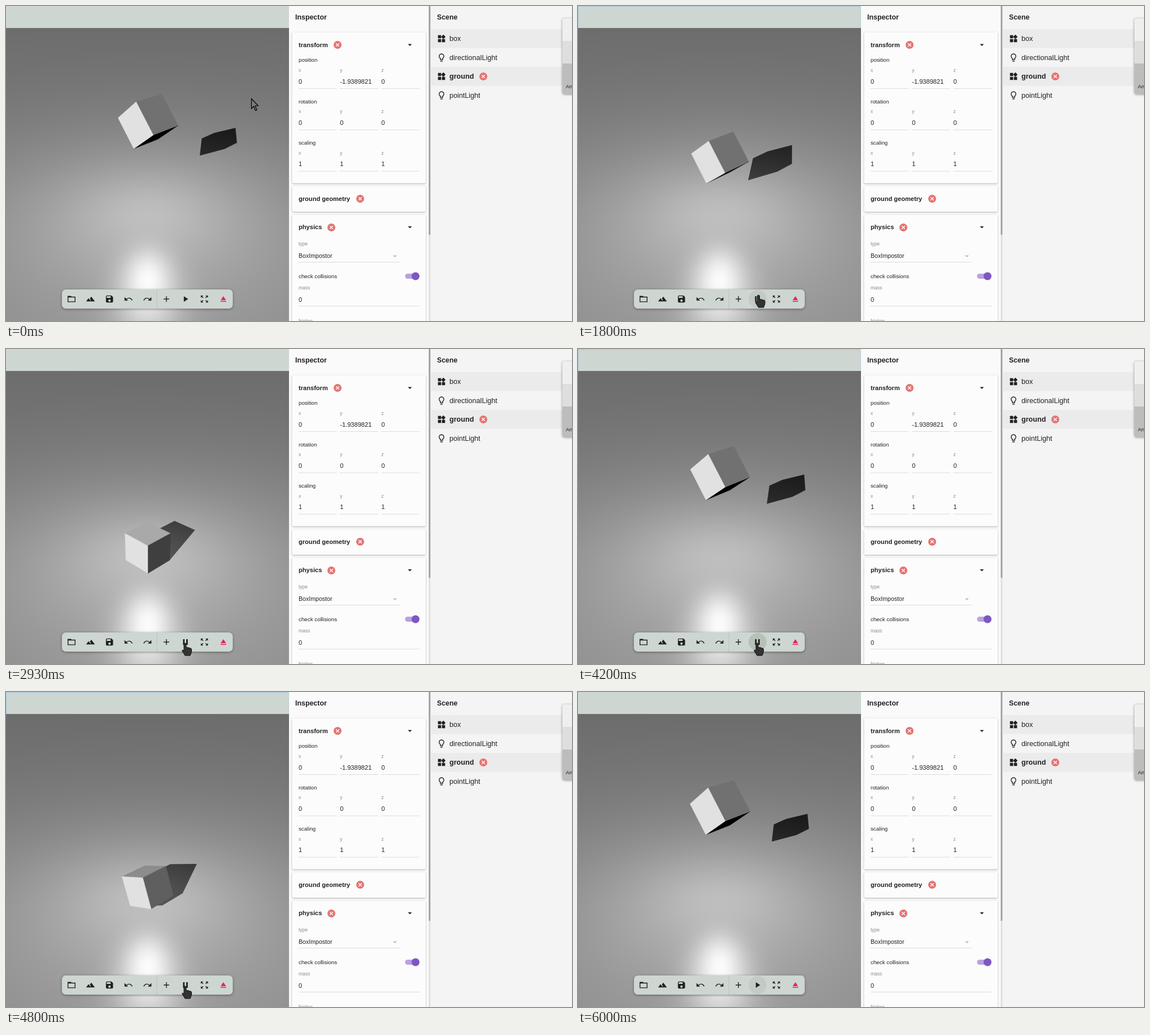
Recreate the animation shown at these times as an HTML page with a canvas. Size 1002 by 559 pixels, loop 6.54 s.

```html
<!DOCTYPE html>
<html lang="en">
<head>
<meta charset="utf-8">
<title>Scene editor</title>
<style>
  html, body { margin: 0; width: 100%; height: 100%; overflow: hidden; background: #f4f4f4; }
  canvas, svg { position: absolute; left: 0; top: 0; }
  text { font-family: "Liberation Sans", Arial, sans-serif; fill: #212121; }
  .bold { font-weight: bold; }
  .dim { fill: #8a8a8a; }
  .card { fill: #fcfcfc; filter: drop-shadow(0 1px 1.5px rgba(0, 0, 0, .3)); }
</style>
</head>
<body>
<canvas id="view" width="501" height="559"></canvas>
<svg id="ui" width="1002" height="559"></svg>
<script>
const LOOP = 6540, W = 501, H = 559;

// ---------- interface ----------
const text = (x, y, size, label, cls = '') =>
  `<text x="${x}" y="${y + size * .35}" font-size="${size}" class="${cls}">${label}</text>`;
const rect = (x, y, w, h, fill, more = '') =>
  `<rect x="${x}" y="${y}" width="${w}" height="${h}" fill="${fill}" ${more}/>`;
const icon = (x, y, shape, more = 'fill="#212121"') =>
  `<g transform="translate(${x - 8.4} ${y - 8.4}) scale(.7)" ${more}>${shape}</g>`;
const path = (d, more = '') => `<path d="${d}" ${more}/>`;
const line = 'fill="none" stroke="#212121" stroke-width="2"';
const remove = (x, y) => `<circle cx="${x}" cy="${y}" r="7" fill="#e57373"/>` +
  path(`M${x - 2.8} ${y - 2.8}l5.6 5.6m0-5.6l-5.6 5.6`, 'stroke="#fff" stroke-width="1.4"');
const caret = (x, y, fill = '#212121') => path(`M${x - 3.5} ${y - 1.5}h7l-3.5 3.5z`, `fill="${fill}"`);
const card = (y, h) => rect(506.5, y, 236.5, h, '#fcfcfc', 'rx="2" class="card"');

const widgets = path('M13 13h8v8h-8zM3 13h8v8H3zM3 3h8v8H3zM16.7 1.7l5.6 5.6-5.6 5.7L11 7.3z');
const bulb = path('M9 17v-3A6 6 0 1 1 15 14v3zM9 21h6', line);
const undo = path('M2 7v9h9z') + path('M6 13C11 7.500 19 9 21.300 15.600', line);
const arrowOut = 'M15 3h6v6l-2.300-2.300-2.900 2.900-1.400-1.400 2.900-2.900z';
const tools = [
  path('M3 7V19H21V7H12L10 5H3V7H21', line),
  path('M14 6l-3.750 5 2.850 3.800-1.600 1.200L7 10l-6 8h22z'),
  path('M3 5l2-2h12l4 4v12l-2 2H5l-2-2zM5 5v4h10V5zM12 13a3 3 0 1 0 .1 0z', 'fill-rule="evenodd"'),
  undo,
  `<g transform="translate(24) scale(-1 1)">${undo}</g>`,
  path('M11 5h2v6h6v2h-6v6h-2v-6H5v-2h6z'),
  path('M8 5v14l11-7z', 'id="play"') + path('M6 5h4v14H6zM14 5h4v14h-4z', 'id="pause"'),
  [0, 90, 180, 270].map(a => path(arrowOut, `transform="rotate(${a} 12 12)"`)).join(''),
  path('M5 17h14v2H5zM12 5L5.300 15h13.400z', 'fill="#e91e63"')
];

const vector = (name, y, values) => text(518, y, 9.7, name) + values.map((value, i) => {
  const x = 518 + 73.2 * i;
  return text(x, y + 18, 8.5, 'xyz'[i], 'dim') + text(x, y + 38, 11.1, value) +
    rect(x, y + 50, 67.5, 1, '#dcdcdc');
}).join('');

const row = (y, name, shape, cls) => icon(771, y, shape) + text(785, y, 12.6, name, cls);

document.getElementById('ui').innerHTML = [
  path('M.5 39V.5H501V39', 'id="focus" fill="none" stroke="#a9c6e0"'),

  rect(501, 0, 248, H, '#fafafa'),
  text(512, 20, 12.4, 'Inspector', 'bold'),
  card(46.5, 268), card(320, 45), card(370.5, 250),
  text(518, 69, 11.1, 'transform', 'bold'), remove(587, 69), caret(715, 69),
  vector('position', 96, ['0', '-1.9389821', '0']),
  vector('rotation', 169.300, ['0', '0', '0']),
  vector('scaling', 242.600, ['1', '1', '1']),
  text(518, 342, 11.1, 'ground geometry', 'bold'), remove(627, 342),
  text(518, 392.500, 11.1, 'physics', 'bold'), remove(576, 393), caret(715, 392.500),
  text(518, 422.500, 8.5, 'type', 'dim'),
  text(518, 443, 10.6, 'BoxImpostor'), caret(688.500, 444, '#bdbdbd'),
  rect(518, 454, 179, 1, '#dcdcdc'),
  text(518, 479.500, 9.8, 'check collisions'),
  rect(706.500, 475, 22, 9, '#b7a3dd', 'rx="4.5"'),
  '<circle cx="725" cy="479.500" r="7" fill="#7e57c2"/>',
  text(518, 500.500, 8.5, 'mass', 'dim'), text(518, 521, 11.1, '0'),
  rect(518, 532, 214, 1, '#dcdcdc'),
  text(518, 559, 8.5, 'friction', 'dim'),

  rect(748.500, 0, 3, H, '#dedede'), rect(748.500, 0, 3, 406, '#9e9e9e'),
  rect(751.500, 0, 251, H, '#f4f4f4'),
  text(763, 20, 12.3, 'Scene', 'bold'),
  rect(751.500, 41, 251, 33.500, '#ebebeb'), rect(751.500, 108, 251, 33.500, '#ebebeb'),
  row(58, 'box', widgets), row(91.500, 'directionalLight', bulb),
  row(125, 'ground', widgets, 'bold'), remove(845, 125), row(158.500, 'pointLight', bulb),
  '<g style="filter:drop-shadow(0 1px 2px rgba(0,0,0,.4))">',
  rect(985, 22, 30, 134, '#bdbdbd', 'rx="4"'),
  path('M985 102V26q0-4 4-4h13v80z', 'fill="#dedede"'),
  path('M985 62V26q0-4 4-4h13v40z', 'fill="#efefef"'), '</g>',
  text(991, 143, 9.7, 'An'),

  rect(99, 503, 302.500, 34, '#cdd6d0', 'rx="7" style="filter:drop-shadow(0 1px 2px rgba(0,0,0,.4))"'),
  rect(266.500, 503, 1, 34, '#b9c2bc'),
  '<circle id="ripple" cx="318" cy="520"/>',
  ...tools.map((shape, i) => icon(116 + 33.600 * i, 520, shape)),

  '<g id="cursor">',
  path('M.5.5V18l4-4 3 7.500 2.600-1-3-7.500h5.400z', 'id="arrow" fill="none" stroke="#000" stroke-width="1.2"'),
  path('M-2 2Q-2 0 0 0T2 2V8Q3 6.500 5 8Q7 7 8 9Q11 8 11.500 11V15Q11 18 9 22H0Q-3 17-5 14Q-6 11-2 13Z',
    'id="hand" fill="#333" stroke="#111"'),
  '</g>'
].join('');

// ---------- 3D scene ----------
const FOCAL = H / 2 / Math.tan(.4), COS = 2 / Math.sqrt(5), SIN = 1 / Math.sqrt(5);
const EYE = [0, 5, -10], FLOOR = -1.939, LAMP = 2.94;
const SLOPE = [1.034, 1.93];               // shadow shift per unit of height
const SUN = [-.431, .417, -.805];
const dot = (a, b) => a[0] * b[0] + a[1] * b[1] + a[2] * b[2];

function project([x, y, z]) {
  const dy = y - EYE[1], dz = z - EYE[2], scale = FOCAL / (COS * dz - SIN * dy);
  return [251 + x * scale, H / 2 - (COS * dy + SIN * dz) * scale];
}

// Sun plus a point lamp with a highlight, traced per pixel
function groundShade(px, py) {
  const u = (px - 251) / FOCAL, v = (H / 2 - py) / FOCAL;
  const eyeHeight = EYE[1] - FLOOR, t = eyeHeight / (SIN - COS * v);
  const x = u * t, z = (SIN * v + COS) * t + EYE[2];
  const lampDist = Math.hypot(x, LAMP, z), eyeDist = Math.hypot(x, eyeHeight, z - EYE[2]);
  const hx = -x / lampDist - x / eyeDist;
  const hy = LAMP / lampDist + eyeHeight / eyeDist;
  const hz = -z / lampDist + (EYE[2] - z) / eyeDist;
  return 104 + 86 * LAMP / lampDist + 86 * (hy / Math.hypot(hx, hy, hz)) ** 64;
}

const ctx = document.getElementById('view').getContext('2d');
const backdrop = ctx.createImageData(W, H);
for (let y = 0, i = 0; y < H; y++) for (let x = 0; x < W; x++, i += 4) {
  const shade = groundShade(x + .5, y + .5);
  backdrop.data.set(y < 39 ? [205, 214, 208, 255] : [shade, shade, shade, 255], i);
}

// Free fall, landing on one edge, tipping flat, a small rock back
function pose(dt) {
  const tipping = dt - .723;
  let tilt = 40;
  if (tipping > 0) tilt = Math.max(0, 40 - 143 * tipping - 340 * tipping ** 2);
  if (dt > .918 && dt < 1.218) tilt = -4 * Math.sin(Math.PI * (dt - .918) / .3);
  const angle = tilt * Math.PI / 180, c = Math.cos(angle), s = Math.sin(angle), d = Math.SQRT1_2;
  return {
    axes: [[-d * s, c, d * s], [-d * c, -s, d * c], [d, 0, d]],
    y: Math.max(FLOOR + (c + Math.abs(s)) / 2, 1.33 - 4.905 * dt * dt)
  };
}

function cubeFaces({ axes, y }) {
  const faces = [];
  for (let i = 0; i < 3; i++) for (const side of [1, -1]) {
    const normal = axes[i].map(n => n * side), a = axes[(i + 1) % 3], b = axes[(i + 2) % 3];
    const points = [[-1, -1], [1, -1], [1, 1], [-1, 1]].map(([p, q]) =>
      [0, y, 0].map((o, k) => o + (normal[k] + a[k] * p * side + b[k] * q) / 2));
    const extra = i === 0 && side > 0 ? 69 : i === 2 ? 15 : 0;
    faces.push({ normal, points, shade: Math.max(0, 240 * dot(normal, SUN)) + extra });
  }
  return faces;
}

function trace(points) {
  points.map(project).forEach(([x, y], i) => i ? ctx.lineTo(x, y) : ctx.moveTo(x, y));
  ctx.closePath();
}

function drawScene(dt) {
  const faces = cubeFaces(pose(dt));
  ctx.putImageData(backdrop, 0, 0);

  ctx.globalCompositeOperation = 'difference';
  ctx.fillStyle = '#696969';
  ctx.beginPath();
  for (const { normal, points } of faces) if (dot(normal, SUN) > 0)
    trace(points.map(([x, y, z]) => [x + SLOPE[0] * (y - FLOOR), FLOOR, z + SLOPE[1] * (y - FLOOR)]));
  ctx.fill();

  ctx.globalCompositeOperation = 'source-over';
  ctx.lineWidth = .5;
  for (const { normal, points, shade } of faces) {
    if (dot(normal, points[0].map((p, k) => EYE[k] - p)) <= 0) continue;
    ctx.fillStyle = ctx.strokeStyle = `rgb(${shade},${shade},${shade})`;
    ctx.beginPath();
    trace(points);
    ctx.fill();
    ctx.stroke();
  }
}

// ---------- timeline ----------
const runs = [
  { click: 1330, drop: 1320, blur: 2930, stop: 3000 },
  { click: 3930, drop: 3970, blur: 5330, stop: 5400 }
];
const cursorKeys = [
  [40, 434, 164], [430, 267, 505], [500, 267, 515], [670, 311, 508], [870, 317, 522],
  [1070, 317, 522], [1200, 319.5, 513], [2340, 319.5, 513], [2530, 317, 522],
  [5610, 317, 522], [5940, 80, 556]
];

function cursorAt(t) {
  const next = cursorKeys.findIndex(key => key[0] > t);
  if (next === 0) return cursorKeys[0].slice(1);
  if (next < 0) return cursorKeys.at(-1).slice(1);
  const [t0, x0, y0] = cursorKeys[next - 1], [t1, x1, y1] = cursorKeys[next];
  const k = (t - t0) / (t1 - t0);
  return [x0 + (x1 - x0) * k, y0 + (y1 - y0) * k];
}

const part = id => document.getElementById(id);
const show = (id, on) => part(id).setAttribute('visibility', on ? 'visible' : 'hidden');

function render(t) {
  const run = runs.findLast(r => t >= r.click);
  const playing = run && t < run.stop;
  drawScene(playing ? Math.max(0, t - run.drop) / 1000 : 0);
  show('play', !playing);
  show('pause', playing);
  show('focus', run && t < run.blur);

  let alpha = 0, radius = 16;
  if (playing) {
    const since = (t - run.click) / 1000;
    alpha = Math.max(0, Math.min(.1, (.65 - since) * .3));
    radius *= Math.min(1, since / .2);
  } else if (run) {
    alpha = .05 * Math.min(1, (t - run.stop) / 130);
  }
  part('ripple').setAttribute('r', radius);
  part('ripple').setAttribute('fill-opacity', alpha);

  const [x, y] = cursorAt(t), visible = t < 5980;
  const overTools = y > 503 && y < 538 && x > 99 && x < 401;
  part('cursor').setAttribute('transform', `translate(${x} ${y})`);
  show('hand', visible && overTools);
  show('arrow', visible && !overTools);
}

function frame() {
  render(performance.now() % LOOP);
  requestAnimationFrame(frame);
}
frame();
</script>
</body>
</html>
```
